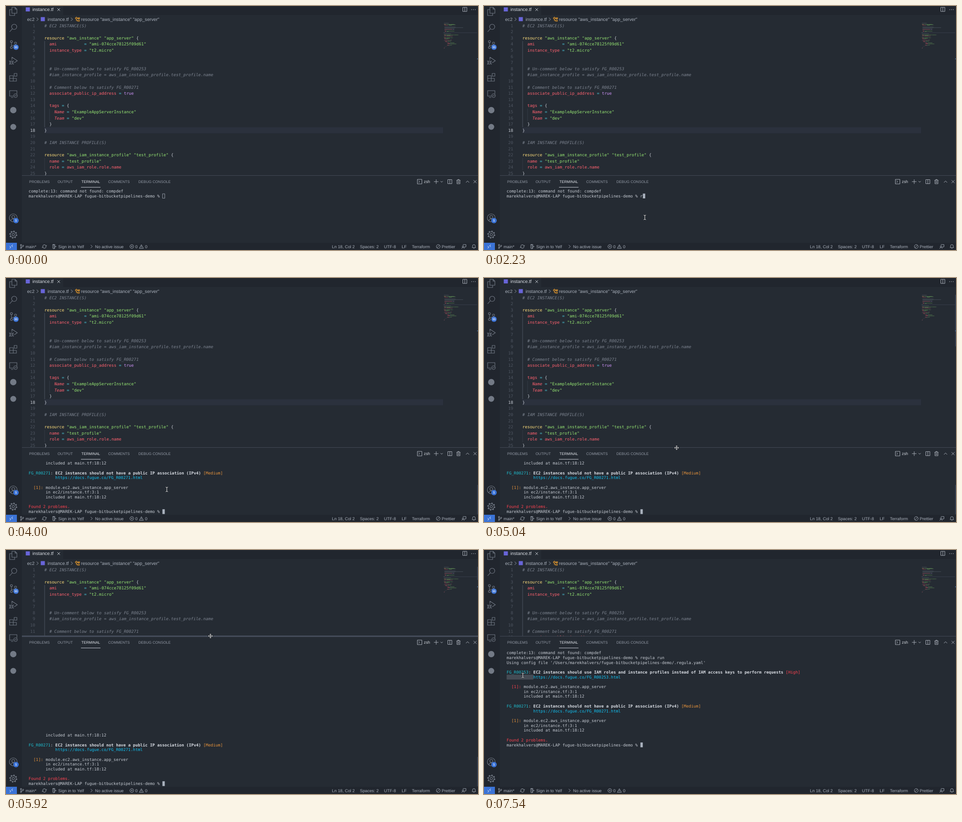
These frames come from a looping animation (1039x539 px, 7990 ms). An HTML page:

```html
<!DOCTYPE html>
<html lang="en">
<head>
<meta charset="utf-8">
<title>Editor and terminal</title>
<style>
html, body { margin: 0; width: 100%; height: 100%; overflow: hidden; background: #252b33; }
svg { display: block; width: 1039px; height: 539px; }
text { text-rendering: geometricPrecision; white-space: pre; }
.mono { font-family: "DejaVu Sans Mono", monospace; }
.ui { font-family: "Liberation Sans", Arial, sans-serif; }
.code { font-size: 9.08px; }
.term { font-size: 8.895px; }
</style>
</head>
<body>
<svg id="stage" viewBox="0 0 1039 539"></svg>
<script>
const LOOP = 7990;
const BG = '#252b33', DARK = '#21262e', TEXT = '#c6cbd3', DIM = '#a9b0bb', GREY = '#737a86', BLUE = '#3b73d6';
const RED = '#ff6270', GREEN = '#96e673', YELLOW = '#ffdf7c', CYAN = '#4cc3d4', PURPLE = '#cd92f7', NOTE = '#7d8490';
const ORANGE = '#e8943c', ID = '#1fbccd', LINK = '#10c4f5', BOLD = '#d9dde4', ALERT = '#ff4250', SCROLL = '#353f4e';

const CODE_H = 13.59, ROW_H = 10.71, CELL = 5.355, TOP = 36;

const code = `# EC2 INSTANCE(S)

resource "aws_instance" "app_server" {
  ami           = "ami-074cce78125f09d61"
  instance_type = "t2.micro"


  # Un-comment below to satisfy FG_R00253
  #iam_instance_profile = aws_iam_instance_profile.test_profile.name

  # Comment below to satisfy FG_R00271
  associate_public_ip_address = true

  tags = {
    Name = "ExampleAppServerInstance"
    Team = "dev"
  }
}

# IAM INSTANCE PROFILE(S)

resource "aws_iam_instance_profile" "test_profile" {
  name = "test_profile"
  role = aws_iam_role.role.name
}`.split('\n');

// lines below the fold, seen only in the minimap
const rest = `
resource "aws_iam_role" "role" {
  name = "test_role"
  path = "/"

  assume_role_policy = <<EOF
{
    Version = "2012-10-17"
    Statement = [
        {
            Action = "sts:AssumeRole"
            Principal = {
               Service = "ec2.amazonaws.com"
            }
            Effect = "Allow"
            Sid = ""
        }
    ]

EOF
}`.split('\n');

const esc = s => s.replace(/&/g, '&amp;').replace(/</g, '&lt;').replace(/ /g, '\u00a0');
const span = ([fill, s, extra = '']) => `<tspan fill="${fill}" ${extra}>${esc(s)}</tspan>`;
const label = (x, y, s, size, fill = DIM, extra = '') =>
  `<text class="ui" x="${x}" y="${y + size * 0.35}" font-size="${size}" fill="${fill}" ${extra}>${esc(s)}</text>`;
const rect = (x, y, w, h, fill, extra = '') =>
  `<rect x="${x}" y="${y}" width="${w}" height="${h}" fill="${fill}" ${extra}/>`;
const icon = (x, y, d, stroke = DIM, w = 0.9) =>
  `<path transform="translate(${x} ${y})" d="${d}" fill="none" stroke="${stroke}" stroke-width="${w}" stroke-linejoin="round"/>`;
const ring = (x, y, r) => `M${x - r} ${y}a${r} ${r} 0 1 0 ${2 * r} 0a${r} ${r} 0 1 0 ${-2 * r} 0`;
const dot = (x, y, r, fill) => `<circle cx="${x}" cy="${y}" r="${r}" fill="${fill}"/>`;

function tokens(line) {
  return (line.match(/#.*|"[^"]*"|\w+|\s+|./g) || []).map(s => {
    if (s[0] === '#') return [NOTE, s, 'font-style="italic"'];
    if (s[0] === '"') return [GREEN, s];
    if (s === 'resource') return [YELLOW, s];
    if (s === 'true') return [PURPLE, s];
    if (s === '=') return [CYAN, s];
    if (s === 'Name' || s === 'Team') return [RED, s, 'font-style="italic"'];
    return [/\w/.test(s) ? RED : TEXT, s];
  });
}

function editor() {
  const mid = n => 43.5 + (n - 1) * CODE_H;
  const guide = (x, a, b, c) => rect(x, mid(a) - CODE_H / 2, 0.8, (b - a + 1) * CODE_H, c);
  let out = rect(84.5, mid(18) - 6.8, 877.5, 13.4, '#2b313d');
  out += guide(84.6, 4, 17, '#596170') + guide(84.6, 23, 24, '#3b424d') + guide(95.5, 15, 16, '#3b424d');
  code.forEach((line, i) => {
    const y = mid(i + 1) + 3.2;
    out += `<text class="mono code" x="64.3" y="${y}" text-anchor="end" fill="${i === 17 ? '#c8cdd5' : '#4f5662'}">${i + 1}</text>`;
    out += `<text class="mono code" x="84.5" y="${y}">${tokens(line).map(span).join('')}</text>`;
  });
  return out;
}

function minimap() {
  let out = rect(962, 58.6, 75, 0.9, '#3a414e');
  code.concat(rest).forEach((line, i) => {
    let x = 964;
    for (const [fill, s] of tokens(line)) {
      const w = s.length * 0.62;
      if (s.trim()) out += rect(x, 37.5 + i * 1.24, w, 0.8, fill, 'opacity=".45"');
      x += w;
    }
  });
  return out;
}

function sidebar() {
  const side = (y, d) => icon(16, y, d, GREY, 1.1);
  const badge = (y, s) => dot(22, y, 6, BLUE) + label(22, y, s, 7, '#fff', 'text-anchor="middle" font-weight="bold"');
  return rect(0, 0, 35, 523, DARK) +
    side(12, 'M-3-9H4L8-5V4H-3ZM4-9V-5H8M-3-4H-8V9H3V4') +
    side(48, ring(2, -2, 5.7) + 'M-2 2.3L-8 9') +
    side(85, ring(-4, -6.5, 2.3) + ring(-4, 6.5, 2.3) + ring(5, -3, 2.3) + 'M-4-4V4M5-.7C5 3-4 1-4 4') +
    badge(91, '11') +
    side(121, 'M-3-2V-8L9 0L2 4.5' + ring(-4, 4, 3.4) + 'M-7.4 4H-.6M-9 0L-6.5 2M-9 8L-6.5 6M1 0L-1.5 2M1 8L-1.5 6') +
    side(157, 'M-8-3H0V9H-8ZM0 3H7V9H0M-8 3H0M2-8H8V-2H2Z') +
    side(194, 'M0 5H-8V-7H8V0M-5 8H0' + ring(5, 4, 4) + 'M3 5L4.5 3.5M5.5 4.5L7 3') +
    dot(16, 230, 7, GREY) + dot(16, 267, 6.5, GREY) +
    side(468, ring(0, 0, 8.7) + ring(0, -2, 3.2) + 'M-5.5 6.5C-4 .8 4 .8 5.5 6.5') + badge(474, '1') +
    side(505, ring(0, 0, 2.6) + ring(0, 0, 6.2)) +
    `<circle cx="16" cy="505" r="7.6" fill="none" stroke="${GREY}" stroke-width="2.2" stroke-dasharray="2.98 2.98"/>`;
}

function header() {
  return rect(35, 0, 1004, 20, DARK) + rect(35, 0, 91, 20, BG) +
    rect(43.5, 3, 9, 9, '#6865d8') + label(58, 7.8, 'instance.tf', 10.25, '#d8dce3') +
    icon(116, 8, 'M-3-3L3 3M3-3L-3 3', '#d0d5dc') +
    icon(1010, 7.5, 'M-4.5-4.5H4.5V4.5H-4.5ZM0-4.5V4.5', '#b8bec8') +
    [1025, 1029, 1033].map(x => dot(x, 8, 0.8, '#b8bec8')).join('') +
    label(46.5, 29.3, 'ec2', 10.1) + icon(69.5, 29.3, 'M-2-3.5L1.5 0L-2 3.5') +
    rect(76.5, 24.5, 9, 9, '#6865d8') + label(91.5, 29.3, 'instance.tf', 10.25) +
    icon(145, 29.3, 'M-2-3.5L1.5 0L-2 3.5') +
    icon(157, 29, 'M-4.5-2L-2-4.5L.5-2L-2 .5ZM0-1.5H4M-2 .5V3.5H1M2-3.3H5V-.5H2ZM1 2H4.5V4.8H1Z', '#e89b2e', 1.1) +
    label(165, 29.3, 'resource "aws_instance" "app_server"', 10.2);
}

function panelBar() {
  const tab = (x, s, on) => label(x, 13.7, s, 8.15, on ? '#e2e6ec' : '#9299a5');
  const tool = (x, d) => icon(x, 13.5, d, '#b8bec8');
  return rect(35, 0, 1004, 349, BG) + rect(35, -0.5, 1004, 1, '#434a56') +
    tab(51, 'PROBLEMS') + tab(113.5, 'OUTPUT') + tab(166, 'TERMINAL', true) + tab(225, 'COMMENTS') + tab(291.5, 'DEBUG CONSOLE') +
    rect(165, 25.4, 43, 1, '#c9ced6') +
    `<g id="shell">${tool(0, 'M-5-5H5V5H-5ZM-2.5-2.5L0 0L-2.5 2.5')}</g>` +
    label(933.5, 13.7, 'zsh', 8.9, '#d0d5dc', 'id="job" text-anchor="end"') +
    tool(947, 'M-5 0H5M0-5V5') + tool(959, 'M-2.5-1.2L0 1.3L2.5-1.2') +
    tool(977, 'M-4.5-4.5H4.5V4.5H-4.5ZM0-4.5V4.5') +
    tool(996, 'M-4.5-3H4.5M-1.5-3V-4.8H1.5V-3M-3.3-3V4.7H3.3V-3M-1-1V3M1-1V3') +
    tool(1016, 'M-3.5 2L0-1.6L3.5 2') + tool(1032.5, 'M-3.3-3.3L3.3 3.3M3.3-3.3L-3.3 3.3') +
    `<g id="sash">${rect(35, -1.6, 1004, 3.2, '#454c5a')}</g>`;
}

function status() {
  const y = 531.3;
  const say = (x, s) => label(x, y, s, 9.3);
  return rect(0, 523, 1039, 16, DARK) + rect(0, 523, 24, 16, BLUE) +
    icon(11.5, y, 'M-3.5-.8L-.7 1.6L-3.5 4M3.5-4L.7-1.6L3.5 .8', '#fff') +
    icon(35, y, ring(-2, -3.3, 1.3) + ring(-2, 3.3, 1.3) + ring(2.6, -1.6, 1.3) + 'M-2-2V2M2.6-.3C2.6 1.8-2 .5-2 2') + say(43, 'main*') +
    icon(84.5, y, 'M-3.8-.7A3.9 3.9 0 0 1 3.5-1.8M3.8 .7A3.9 3.9 0 0 1-3.5 1.8M1.8-.8L4.3-.6L4.7-3M-1.8 .8L-4.3 .6L-4.7 3') +
    icon(106.5, y, 'M-3.5-4.5H1V-2M-3.5-4.5V4L-.5 5V-3L-3.5-4.5M-.5 4H1V2M4.5 0H1.2M2.6-1.5L1 0L2.6 1.5') + say(115, 'Sign in to Yelf') +
    icon(188.5, y, 'M-2-3.5L1.5 0L-2 3.5') + say(196, 'No active issue') +
    icon(277, y, ring(0, 0, 4.2) + 'M-1.8-1.8L1.8 1.8M1.8-1.8L-1.8 1.8') + say(284.5, '0') +
    icon(298, y, 'M0-4L4.5 4H-4.5ZM0-1.3V1.5M0 2.2V3') + say(306, '0') +
    say(717.5, 'Ln 18, Col 2') + say(779, 'Spaces: 2') + say(832, 'UTF-8') + say(871, 'LF') + say(893.5, 'Terraform') +
    icon(951.5, y, ring(0, 0, 4.2) + 'M-3 3L3-3') + say(959, 'Prettier') +
    icon(1008, y, ring(-2, 0, 1.7) + 'M-4.7 4.5C-4.5 1.2 .5 1.2 .7 4.5M-2.5-4.3H4.5V.7H3L1.5 2.2V.7') +
    icon(1030, y, 'M-4 2.5H4L3 .7V-1.3A3 3 0 0 0-3-1.3V.7ZM-1 4H1');
}

const prompt = 'marekhalvers@MAREK-LAP fugue-bitbucketpipelines-demo % ';
const strong = 'font-weight="bold"';
const finding = (id, title, level, color) => [
  [[ID, id], [TEXT, ': '], [BOLD, title, strong], [color, ` [${level}]`]],
  [[LINK, `           https://docs.fugue.co/${id}.html`]],
  [],
  [[color, '  [1]:'], [TEXT, ' module.ec2.aws_instance.app_server']],
  [[TEXT, '       in ec2/instance.tf:3:1']],
  [[TEXT, '       included at main.tf:18:12']],
  []
];
const rows = [
  [[TEXT, 'complete:13: command not found: compdef']],
  [[TEXT, prompt], [TEXT, '', 'id="typed"']],
  [[TEXT, "Using config file '/Users/marekhalvers/fugue-bitbucketpipelines-demo/.regula.yaml'"]],
  [],
  ...finding('FG_R00253', 'EC2 instances should use IAM roles and instance profiles instead of IAM access keys to perform requests', 'High', ALERT),
  ...finding('FG_R00271', 'EC2 instances should not have a public IP association (IPv4)', 'Medium', ORANGE),
  [[ALERT, 'Found 2 problems.']],
  [[TEXT, prompt]]
];

function terminal() {
  return `<g id="term">${rect(0, 5 * ROW_H - 5.1, 11 * CELL, ROW_H, '#454b54', 'id="mark"')}` +
    rows.map((r, i) => `<text class="mono term row" y="${i * ROW_H + 3.1}">${r.map(span).join('')}</text>`).join('') +
    rect(0, 0, 5.2, 10.6, '#aab2be', 'id="caret"') + '</g>';
}

const beamPath = 'M-2.5-5Q0-5 0-3.8Q0-5 2.5-5M0-4V4M-2.5 5Q0 5 0 3.8Q0 5 2.5 5';
const arms = 'M-4 0H4M0-4V4M-3-1.6L-4.7 0L-3 1.6M3-1.6L4.7 0L3 1.6M-1.6-3L0-4.7L1.6-3M-1.6 3L0 4.7L1.6 3';
const outlined = (id, d) => `<g id="${id}">${icon(0, 0, d, '#15181d', 2.4)}${icon(0, 0, d, '#fff', 1)}</g>`;
const pointers = outlined('beam', beamPath) + outlined('move', arms) +
  '<path id="arrow" d="M0 0V11L2.6 8.6L4.4 12.4L6 11.6L4.3 8H7.7Z" fill="#111" stroke="#fff" stroke-width=".8"/>';

const stage = document.getElementById('stage');
stage.innerHTML = rect(0, 0, 1039, 539, BG) + editor() + minimap() + header() +
  rect(1037, 37, 2, 10, SCROLL, 'id="slider"') + rect(1037, 0, 2, 1.2, '#5382bd', 'id="ruler"') +
  `<g id="panel">${panelBar()}</g>` + terminal() +
  rect(1037, 457, 2, 65, SCROLL, 'id="scroll"') + sidebar() + status() + pointers;

const el = {};
stage.querySelectorAll('[id]').forEach(e => el[e.id] = e);
const lines = [...stage.querySelectorAll('.row')];
const show = (e, on) => e.setAttribute('visibility', on ? 'visible' : 'hidden');
const place = (e, x, y) => e.setAttribute('transform', `translate(${x} ${y})`);
const set = (e, o) => { for (const k in o) e.setAttribute(k, o[k]); };
const at = (keys, t) => keys.filter(k => k[0] <= t).pop();

// each entry holds from its time until the next
const mouse = [
  [0, 0, 0, ''], [450, 17, 66, 'arrow'], [596, 96, 190, 'beam'], [742, 226, 362, 'beam'], [888, 318, 470, 'beam'],
  [1034, 346, 490, 'beam'], [1180, 354, 467, 'beam'],
  [4300, 362, 452, 'beam'], [4450, 383, 412, 'beam'], [4600, 404, 382, 'arrow'], [4740, 416, 368, 'beam'],
  [4890, 422, 373, 'move'], [5040, 424, 375, 'move'],
  [5330, 428, 360, 'move'], [5475, 434, 312, 'move'], [5620, 441, 246, 'move'], [5770, 448, 202, 'move'],
  [5920, 450, 190, 'move'], [6065, 420, 198, 'arrow'], [6210, 272, 232, 'beam'], [6360, 147, 259, 'beam'],
  [6660, 140, 261, 'beam'], [6810, 121, 267, 'beam'], [6955, 102, 273, 'beam'], [7100, 90, 276, 'beam'], [7250, 85.5, 277, 'beam']
];
const typing = [[0, 0], [2230, 1], [2375, 3], [2520, 4], [2820, 6], [2965, 7], [3110, 8], [3255, 9], [3400, 10]];
const split = [[0, 374.5], [5475, 352], [5620, 306.3], [5770, 226], [5920, 190.5]];

function draw(t) {
  const [, n] = at(typing, t);
  const [, edge] = at(split, t);
  const [, mx, my, kind] = at(mouse, t);
  const done = t >= 4000, running = t >= 3550 && !done, tall = t >= 6065;

  place(el.panel, 0, edge);
  show(el.sash, t >= 5330 && t < 6065);
  el.job.textContent = running ? 'regula' : 'zsh';
  place(el.shell, running ? 899 : 910.5, 0);

  const first = done && !tall ? 9 : 0;
  const count = done ? rows.length : running ? 3 : 2;
  place(el.term, 49.8, (tall ? 227 : 409) - first * ROW_H);
  lines.forEach((r, i) => show(r, i >= first && i < count));
  el.typed.textContent = 'regula run'.slice(0, n).replace(' ', '\u00a0');
  const row = done ? rows.length - 1 : running ? 3 : 1;
  const col = running ? 0 : prompt.length + (done ? 0 : n);
  const idle = t < 1180;
  set(el.caret, {
    x: col * CELL + (idle ? 0.4 : 0), y: row * ROW_H - (idle ? 4.8 : 5.3),
    width: idle ? 4.8 : 5.2, height: idle ? 9.8 : 10.6,
    fill: idle ? 'none' : '#aab2be', stroke: idle ? '#aab2be' : 'none', 'stroke-width': 0.8
  });
  show(el.mark, t >= 7540);
  show(el.scroll, done && !tall);

  const h = edge - TOP, total = 50 * CODE_H + h - CODE_H;
  set(el.slider, { height: h * h / total });
  show(el.slider, t >= 4740 && t < 6360);
  set(el.ruler, { y: TOP + 17.5 * CODE_H / total * h });

  for (const k of ['beam', 'move', 'arrow']) show(el[k], k === kind);
  if (kind) place(el[kind], mx, my);
}

const start = performance.now();
function tick() {
  draw((performance.now() - start) % LOOP);
  requestAnimationFrame(tick);
}
tick();
</script>
</body>
</html>
```
